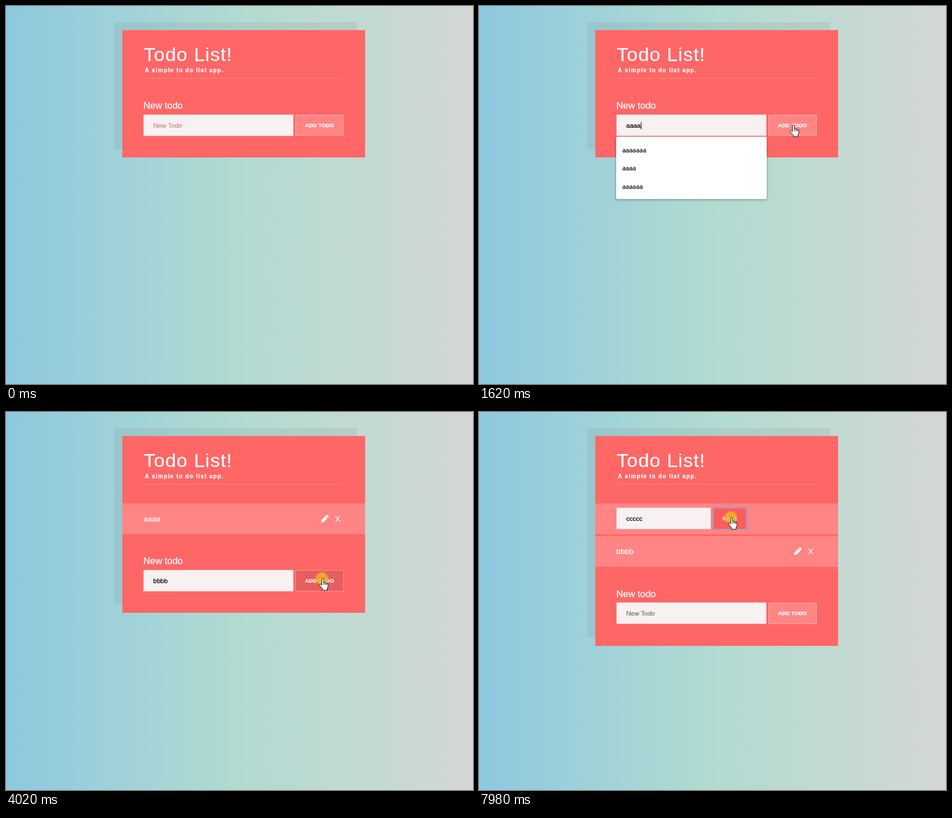
Write an HTML page with a canvas that moves like this. It is 831x674 px and loops after 8 s.

```html
<!DOCTYPE html>
<html lang="en">
<head>
<meta charset="utf-8">
<title>Todo List</title>
<style>
  html, body { margin: 0; width: 100%; height: 100%; overflow: hidden; }
  canvas { display: block; }
</style>
</head>
<body>
<canvas id="stage" width="831" height="674"></canvas>
<script>
const ctx = document.getElementById('stage').getContext('2d');
const LOOP = 8000;
const DELAY = 70; // from a click to its effect
const ARIAL = '"Liberation Sans", Arial, sans-serif';
const MENU_FONT = '11px "Open Sans", sans-serif';
const INPUT_FONT = '11.52px ' + ARIAL;

// Moments of each mouse press
const CLICK = { focusA: 620, addA: 1850, focusB: 2690, addB: 4020,
  edit: 4570, focusEdit: 5260, select: 6800, save: 7980 };
const SELECT_END = 7050, ERASE = 7200;

// Pointer moves: start, end, x, y reached
const MOVES = [
  [70, 540, 346, 212], [1300, 1620, 558, 212], [1930, 2310, 332, 286], [2460, 2540, 341, 308],
  [3000, 3700, 562, 297], [4090, 4400, 566, 194], [4650, 5110, 324, 199], [6110, 6270, 372, 197],
  [6420, 6800, 288, 198], [6800, 7050, 222, 190], [ERASE, 7350, 404, 196], [7520, 7820, 448, 188]
];

const HISTORY = ['b', 'a', 'aa', 'bb', 'aaa', 'aaaaaaa', 'aaaa', 'aaaaaa'];

const HAND = new Path2D('M0 2Q0 0 1.7 0T3.4 2V7Q5 6 6.3 7.6Q8 7 9 8.7Q11.5 8.4 11.4 11Q11.4 15 9.5 18V21H1.5V18.5L-3.8 12.5Q-5 10 -3 9.6Q-1.5 9.8 0 12Z');
const FINGERS = new Path2D('M3.4 7V11M6.3 7.6V11.4M9 8.7V11.8');
const ARROW = new Path2D('M.5 .5V15L3.9 11.9L6.2 17.2L8.4 16.2L6.1 11H10.6Z');
const IBEAM = new Path2D('M-2.5 -6.5H-.5L.5 -5.5L1.5 -6.5H3.5M.5 -5.5V6.5M-2.5 7.5H-.5L.5 6.5L1.5 7.5H3.5');
const PENCIL = new Path2D('M0 13.5L.5 9.8L7.2 3.1L10.9 6.8L4.2 13.5ZM8 2.3L9.6 .7Q10.6 -.3 11.6 .7L13.3 2.4Q14.3 3.4 13.3 4.4L11.7 6Z');

const within = (t, a, b) => t >= a && t < b;
const clamp = (v, lo, hi) => Math.min(hi, Math.max(lo, v));
const smooth = k => k * k * (3 - 2 * k);

// Keys struck one after another at an even pace
const typed = (t, key, start, gap, count) =>
  key.repeat(clamp(Math.floor((t - start) / gap) + 1, 0, count));

function newText(t) {
  if (t < CLICK.addA + DELAY) return typed(t, 'a', 840, 170, 4);
  if (t < CLICK.addB + DELAY) return typed(t, 'b', 2780, 280, 4);
  return '';
}

const editText = t => (t < ERASE ? 'aaaa' : '') + typed(t, 'c', 5810, 115, 5);

function pointerAt(t) {
  let x = 626, y = 566;
  for (const [start, end, toX, toY] of MOVES) {
    const k = smooth(clamp((t - start) / (end - start), 0, 1));
    x += (toX - x) * k;
    y += (toY - y) * k;
  }
  return [Math.round(x), Math.round(y)];
}

function box(x0, y0, x1, y1, fill) {
  ctx.fillStyle = fill;
  ctx.fillRect(x0, y0, x1 - x0, y1 - y0);
}

function outline(x0, y0, x1, y1, color, width = 1) {
  ctx.strokeStyle = color;
  ctx.lineWidth = width;
  ctx.strokeRect(x0 + 0.5, y0 + 0.5, x1 - x0 - 1, y1 - y0 - 1);
}

const focusRing = (x0, y0, x1, y1) => outline(x0, y0, x1, y1, '#8b90d6', 1.6);

// A hairline stroke gives the letters a slightly firmer weight
function text(str, x, y, font, fill, align = 'left', spacing = 0) {
  ctx.font = font;
  ctx.textAlign = align;
  ctx.letterSpacing = spacing + 'px';
  ctx.fillStyle = ctx.strokeStyle = fill;
  ctx.lineWidth = 0.25;
  ctx.fillText(str, x, y);
  ctx.strokeText(str, x, y);
}

function inputWidth(str) {
  ctx.font = INPUT_FONT;
  ctx.letterSpacing = '0px';
  return ctx.measureText(str).width;
}

function field(right, top, str, caret) {
  box(244.7, top - 0.3, right + 0.3, top + 37.7, '#f7f1f1');
  const base = Math.round(top) + 23;
  text(str, 262, base, INPUT_FONT, '#000');
  if (caret) {
    const x = Math.round(262 + inputWidth(str));
    box(x, base - 10, x + 1, base + 3, '#000');
  }
}

function button(label, x0, y0, x1, y1, fill) {
  box(x0, y0, x1, y1, fill);
  outline(x0, y0, x1, y1, 'rgba(255,255,255,.35)');
  text(label, (x0 + x1) / 2 - 0.3, Math.round((y0 + y1) / 2) + 3, 'bold 9.7px ' + ARIAL, '#fff', 'center');
}

function menu(right, top, prefix) {
  const items = HISTORY.filter(h => h.startsWith(prefix)).slice(0, 6);
  if (!items.length) return;
  ctx.save();
  ctx.shadowColor = 'rgba(0,0,0,.4)';
  ctx.shadowBlur = 4;
  ctx.shadowOffsetY = 1;
  ctx.fillStyle = '#fff';
  ctx.beginPath();
  ctx.roundRect(244, top, right - 244, items.length * 32.4 + 14, 3);
  ctx.fill();
  ctx.restore();
  items.forEach((s, i) => text(s, 255, Math.round(top + 28 + i * 32.4), MENU_FONT, '#000'));
}

function todo(str, mid) {
  text(str, 244.5, mid + 5, '13.7px ' + ARIAL, '#fff');
  text('X', 590.3, mid + 5, '13.7px ' + ARIAL, '#fff', 'center');
  ctx.save();
  ctx.translate(560.6, mid - 7);
  ctx.fillStyle = '#fff';
  ctx.fill(PENCIL);
  ctx.restore();
}

function selection(t, str) {
  const end = 262 + inputWidth('aaaa');
  const start = clamp(pointerAt(t)[0], 262, end);
  box(start, 183, end, 198, '#3390ff');
  ctx.save();
  ctx.beginPath();
  ctx.rect(start, 180, end - start, 20);
  ctx.clip();
  text(str, 262, 194, INPUT_FONT, '#fff');
  ctx.restore();
}

function editor(t) {
  const str = editText(t);
  const focused = within(t, CLICK.focusEdit, CLICK.save);
  const selecting = within(t, CLICK.select, ERASE);
  const saving = t >= CLICK.save;
  field(412, 171, str, focused && !selecting);
  if (selecting) selection(t, str);
  button('SAVE', 417, 171, 476, 209, saving ? '#fd5c5c' : '#f66');
  if (focused) focusRing(244, 170, 413, 210);
  if (saving) focusRing(416, 170, 477, 209);
}

function pointer(t, top, rows, editing) {
  if (t < MOVES[0][0]) return;
  const [x, y] = pointerAt(t);
  const dragging = within(t, CLICK.select, SELECT_END);
  if (dragging || Object.values(CLICK).some(c => within(t, c, c + DELAY))) {
    ctx.fillStyle = 'rgba(241,179,38,.82)';
    ctx.beginPath();
    ctx.arc(x, y, 11, 0, Math.PI * 2);
    ctx.fill();
  }
  const over = (x0, x1, y0, y1) => x >= x0 && x <= x1 && y >= y0 && y <= y1;
  const typing = dragging || over(245, 511, top, top + 38) || (editing && over(245, 412, 171, 209));
  const clicking = over(515, 601, top, top + 38) ||
    (editing ? over(417, 476, 171, 209) : rows > 0 && over(560, 596, 182, 197));
  ctx.save();
  ctx.translate(x, y);
  ctx.lineWidth = 1;
  ctx.lineJoin = 'round';
  ctx.strokeStyle = '#111';
  ctx.fillStyle = '#fff';
  if (typing) {
    ctx.stroke(IBEAM);
  } else {
    const shape = clicking ? HAND : ARROW;
    ctx.fill(shape);
    ctx.stroke(shape);
    if (clicking) ctx.stroke(FINGERS);
  }
  ctx.restore();
}

function card(bottom) {
  const sky = ctx.createLinearGradient(0, 0, 831, 0);
  sky.addColorStop(0, '#8ec8df');
  sky.addColorStop(0.5, '#b1dbd1');
  sky.addColorStop(1, '#d3d7d4');
  box(0, 0, 831, 674, sky);
  box(193, 29, 625, bottom - 15, 'rgba(100,100,100,.11)');
  box(207, 43, 639, bottom, '#f66');
  text('Todo List!', 245, 98, '34px ' + ARIAL, '#fff', 'left', 1.25);
  text('A simple to do list app.', 247, 118, 'bold 10px ' + ARIAL, '#fff', 'left', 1.3);
  box(245, 128, 600, 130, 'rgba(255,220,180,.13)');
}

function draw(t) {
  const rows = [CLICK.addA, CLICK.addB].filter(c => t >= c + DELAY).length;
  const shift = [0, 88.4, 146.6][rows];
  const editing = t >= CLICK.edit + DELAY;
  const top = Math.round(193.6 + shift), bottom = Math.round(231.4 + shift);

  card(Math.round(269.9 + shift));
  if (rows > 0) {
    box(207, 163, 639, 218, '#ff8585');
    if (editing) editor(t); else todo('aaaa', 190);
  }
  if (rows > 1) {
    box(207, 221, 639, 276, '#ff8585');
    todo('bbbb', 248);
  }

  const str = newText(t);
  const open = within(t, CLICK.focusA, CLICK.addA) || within(t, CLICK.focusB, CLICK.addB);
  text('New todo', 244.5, Math.round(183 + shift), '16.6px ' + ARIAL, '#fff');
  field(511, top, str, open);
  if (!str) text('New Todo', 262, top + 23, INPUT_FONT, rows ? '#757575' : '#cf8583');

  const pressed = [CLICK.addA, CLICK.addB].some(c => within(t, c, c + 2 * DELAY));
  button('ADD TODO', 515, top, 601, bottom, pressed ? '#e85e5e' : '#ff8585');
  if (open) menu(512, bottom + 2, str);
  if (within(t, CLICK.focusEdit + DELAY, 5810)) menu(414, 211, 'aaaa');
  pointer(t, top, rows, editing);
}

function frame(now) {
  draw(now % LOOP);
  requestAnimationFrame(frame);
}
requestAnimationFrame(frame);
</script>
</body>
</html>
```
